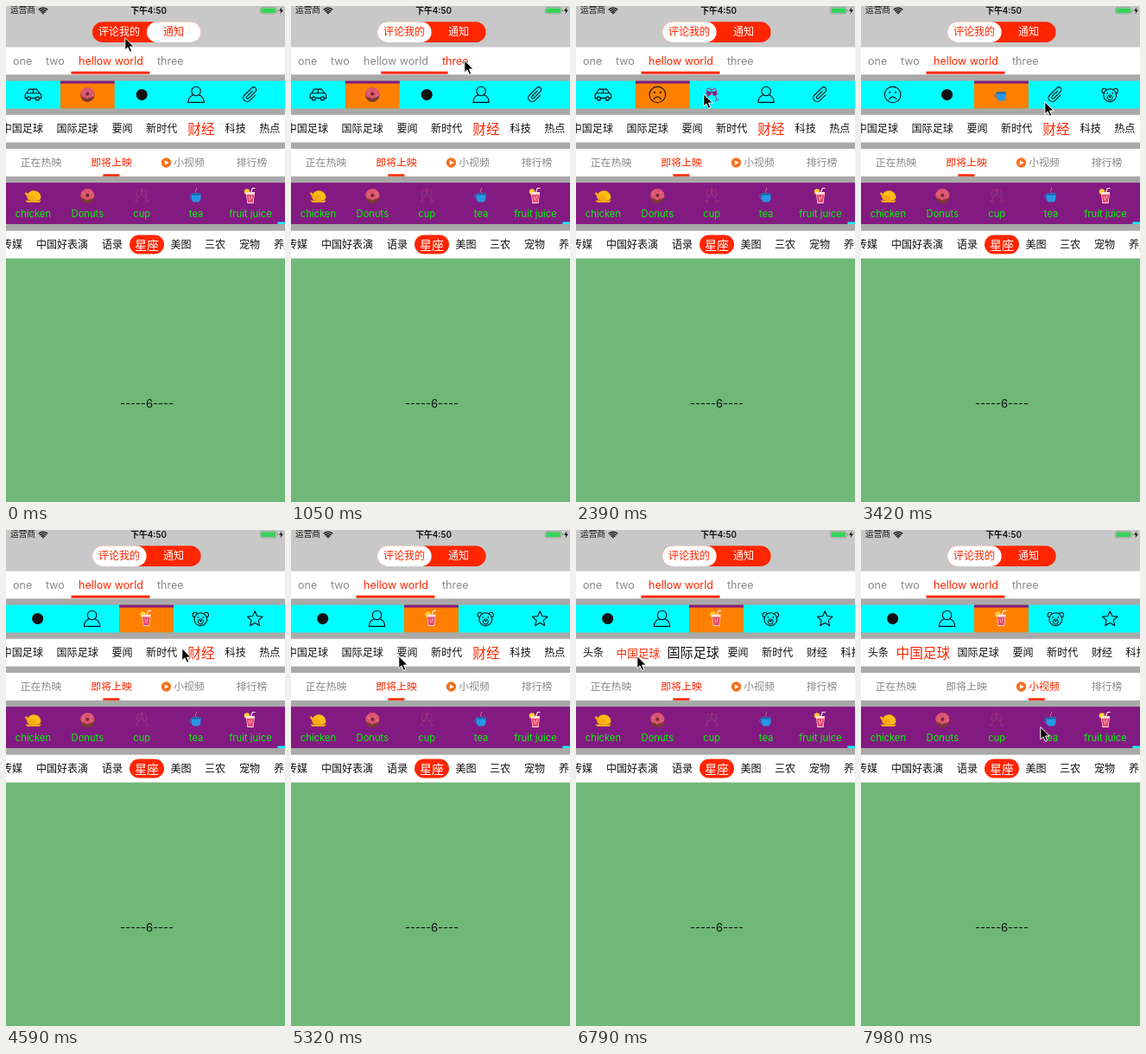
These frames come from a looping animation (323 px wide and 573 px high, 8 s). An HTML page with a canvas:

```html
<!DOCTYPE html>
<html lang="zh">
<head>
<meta charset="utf-8">
<title>Tab bars</title>
<style>
html, body { margin: 0; width: 100%; height: 100%; overflow: hidden; background: #a9a9a9; }
canvas { display: block; width: 323px; height: 573px; }
</style>
</head>
<body>
<canvas id="stage"></canvas>
<script>
const W = 323, H = 573, LOOP = 8000, TICK = 147.5;
const PT = W / 375;
const RED = '#ff2600', CYAN = '#00fdff', PURPLE = '#831a82', ORANGE = '#ff8000', GRAY = '#888';
const FONT = 'Inter, "Noto Sans CJK SC", "Noto Sans CJK", sans-serif';
const BODY = 14 * PT;

const canvas = document.getElementById('stage');
const ctx = canvas.getContext('2d');
const dpr = window.devicePixelRatio || 1;
canvas.width = W * dpr;
canvas.height = H * dpr;

const mix = (a, b, p) => a + (b - a) * p;
const clamp = (v, lo, hi) => Math.min(hi, Math.max(lo, v));
const ease = x => x * x * (3 - 2 * x);

// taps: [time, index]; gives the last two selections and the progress between them
function selection(taps, t) {
  let i = 0;
  while (i + 1 < taps.length && taps[i + 1][0] <= t) i++;
  const to = taps[i][1];
  const from = i ? taps[i - 1][1] : to;
  const p = ease(clamp((t - taps[i][0]) / 2, 0, 1));
  return { to, at: f => mix(f(from), f(to), p) };
}

const taps = {
  pill: [[-9, 1], [0.3, 0]],
  words: [[-9, 2], [6.25, 3], [10.4, 2]],
  icons: [[-9, 1], [15.62, 2], [20.5, 3], [24.5, 4]],
  topics: [[-9, 5], [37.5, 3], [41.5, 2], [45.5, 1]],
  films: [[-9, 1], [49.5, 2]]
};

const pointer = [
  [0, 137, 36], [2, 137, 36], [3, 172, 66], [4, 200, 62], [8, 200, 62], [10, 124, 58],
  [13, 122, 60], [14, 143, 102], [15, 147, 101], [17, 147, 101], [18, 185, 116],
  [19, 212, 110], [26, 212, 110], [28, 226, 128], [29, 229, 136], [30, 229, 136],
  [31, 203, 136], [32, 185, 134], [36, 124, 145], [39, 124, 145], [40, 101, 147],
  [43, 101, 147], [44, 70, 145], [47, 70, 145], [49, 200, 176], [51, 200, 176],
  [53, 195, 217], [54, 207, 227]
];

function pointerAt(t) {
  const i = pointer.findIndex(k => k[0] >= t);
  if (i <= 0) return pointer[i ? pointer.length - 1 : 0].slice(1);
  const [a, b] = [pointer[i - 1], pointer[i]];
  const p = (t - a[0]) / (b[0] - a[0]);
  return [mix(a[1], b[1], p), mix(a[2], b[2], p)];
}

// ---- drawing helpers ----
function rect(x, y, w, h, color) {
  ctx.fillStyle = color;
  ctx.fillRect(x, y, w, h);
}

// full-width band, top and bottom in points
function band(top, bottom, color) {
  rect(0, top * PT, W, (bottom - top) * PT, color);
}

function text(str, x, y, size, color, weight = 400, align = 'center') {
  ctx.font = `${weight} ${size}px ${FONT}`;
  ctx.textAlign = align;
  ctx.fillStyle = color;
  ctx.fillText(str, x, y + size * 0.36);
}

function capsule(x, y, w, h) {
  ctx.beginPath();
  ctx.roundRect(x, y, w, h, h / 2);
}

function line(d, color = '#111', width = 1.1) {
  ctx.strokeStyle = color;
  ctx.lineWidth = width;
  ctx.stroke(new Path2D(d));
}

function shape(d, color) {
  ctx.fillStyle = color;
  ctx.fill(new Path2D(d), 'evenodd');
}

const ring = (x, y, r) => `M${x - r},${y}a${r},${r} 0 1 1 ${2 * r},0a${r},${r} 0 1 1 ${-2 * r},0z`;

function at(x, y, draw, angle = 0) {
  ctx.save();
  ctx.translate(x, y);
  ctx.rotate(angle);
  draw();
  ctx.restore();
}

// ---- icons, centred on the origin ----
function car() {
  line('M-7,4H-9.3V0Q-9.3,-1.3 -7.5,-1.7L-5,-6.3H4L7.3,-1.7Q9.3,-1.2 9.3,1V4H7M3,4H-3M-7.5,-1.7H7.3M0,-6.3V-1.7');
  line(ring(-5, 4.5, 2) + ring(5, 4.5, 2));
}

function sad() {
  line(ring(0, 0, 9.3));
  shape(ring(-3.4, -2.6, 1.1) + ring(3.4, -2.6, 1.1), '#111');
  line('M-4.3,5.2Q0,-0.2 4.3,5.2');
}

const badge = () => shape(ring(0, 0, 6.5), '#111');

function person() {
  line(ring(0, -4, 5.2));
  line('M-3.2,0.4C-7,1.6 -9,4 -9.2,9H9.2C9,4 7,1.6 3.2,0.4');
}

function clip() {
  at(0, 0, () => line('M4.4,-3.4V5.4A4.4,4.4 0 0 1 -4.4,5.4V-6.6A3,3 0 0 1 1.6,-6.6V4.4A1.5,1.5 0 0 1 -1.4,4.4V-4.4'), 0.8);
}

function bear() {
  line('M-4,-5.6A2.8,2.8 0 1 0 -7,-1.6M4,-5.6A2.8,2.8 0 1 1 7,-1.6');
  line(ring(0, 0.8, 7.4));
  line(ring(0, 3.4, 3), '#111', 1);
  shape(ring(-3, -1.6, 0.9) + ring(3, -1.6, 0.9) + ring(0, 2.7, 1.2), '#111');
}

function star() {
  let d = '';
  for (let i = 0; i < 10; i++) {
    const r = i % 2 ? 4.3 : 9.3, a = i * Math.PI / 5;
    d += `${i ? 'L' : 'M'}${r * Math.sin(a)},${0.6 - r * Math.cos(a)}`;
  }
  line(d + 'z');
}

function donut() {
  shape(ring(0, 0.4, 8.2), '#7a3a30');
  shape('M-8,-1A8,7.4 0 0 1 8,-1Q8,2.6 5.8,2.4Q4,4.6 1.8,3.4Q-.5,6.5 -3,3.2Q-7.4,3.6 -8,-1z', '#dc5470');
  shape(ring(0, -0.8, 2), '#6a2c30');
  line('M-5,-2.6l1,.8M4.4,-4l-1,1M5,0l.8,.8', '#f3a9b4', 0.8);
}

function glasses() {
  for (const s of [-1, 1]) {
    at(4 * s, 0, () => {
      shape('M-2.7,-4H2.7L2.2,0Q0,2.6 -2.2,0z', '#7b2583');
      line('M-2.7,-6.8H2.7L2.4,-.5Q0,2.6 -2.4,-.5zM0,1.6V6.4M-2.2,6.8H2.2', '#a8327a', 0.8);
    }, -0.3 * s);
  }
  line('M0,-8.8V-7.6', '#d4566b', 0.8);
}

function tea() {
  line('M-4.4,-1Q-8,-1.4 -7.2,1.4Q-6.4,3.8 -3.6,3.6', '#1f7fd0', 1.1);
  shape('M-5.4,-3H5.4V2.6Q5,7 1.8,7H-1.8Q-5,7 -5.4,2.6z', '#2797e6');
  shape('M-5.4,-3H5.4V-1H-5.4z', '#1769ac');
}

function mug() {
  line('M0,-4Q-1.6,-5.8 0,-7.2T0,-9.4', '#d67a8d', 0.9);
  tea();
}

function juice() {
  line('M0,-3L2.4,-9H5.2', '#ffe6ec', 1.2);
  shape(ring(-4, -5, 3.2), '#ffcf2f');
  shape('M-5.2,-4.6H5.2L3.6,8.6H-3.6z', '#ffe2e0');
  shape('M-4.4,-1.8H4.4L3,7.6H-3z', '#ea4a70');
  line('M-1.4,1L-.4,4.4M1.8,0L1,3', '#ffb3b8', 1);
}

function chicken() {
  shape('M9,2C9,-4 4,-7 -1,-6C-5,-5 -7.5,-2 -7,2C-6.5,6.5 8.5,7 9,2z', '#fdbb16');
  shape('M3,3C3,-1 -2,-2 -4,0L-8,-4.6l-1.8,1.6L-5.6,2.4C-4,6 2,6.5 3,3z', '#f9a90f');
  shape('M9.5,5H-9L-7,7.6H7.4z', '#f0a81a');
}

// ---- rows ----
function statusBar() {
  text('运营商', 5, 5, 9.7, '#111', 400, 'left');
  for (const r of [2.6, 4.9, 7.2]) {
    ctx.beginPath();
    ctx.arc(43, 9.3, r, -2.3, -0.84);
    ctx.strokeStyle = '#111';
    ctx.lineWidth = 1.4;
    ctx.stroke();
  }
  shape(ring(43, 8.6, 0.9), '#111');
  text('下午4:50', 165, 5, 9.8, '#111', 600);
  ctx.beginPath();
  ctx.roundRect(294.5, 1.5, 18.5, 7.5, 2);
  ctx.strokeStyle = '#8c9c8c';
  ctx.lineWidth = 0.8;
  ctx.stroke();
  ctx.beginPath();
  ctx.roundRect(295.5, 2.5, 16.5, 5.5, 1);
  ctx.fillStyle = '#35d35a';
  ctx.fill();
  rect(313.8, 4, 1, 2.6, '#8c9c8c');
  shape('M319.5,1L316,5.8H318.4L317.4,9.4L321,4.4H318.6z', '#111');
}

function pillRow(t) {
  const x = selection(taps.pill, t).at(i => 100 + i * 63);
  const labels = color => {
    text('评论我的', 131, 30, BODY, color);
    text('通知', 194, 30, BODY, color);
  };
  capsule(100, 18.3, 125.6, 23.7);
  ctx.fillStyle = RED;
  ctx.fill();
  labels('#fff');
  ctx.save();
  capsule(x, 18.3, 62.6, 23.7);
  ctx.clip();
  rect(x, 18, 63, 25, '#fff');
  labels(RED);
  ctx.restore();
}

const words = [['one', 8, 22], ['two', 46, 22], ['hellow world', 84, 74], ['three', 175, 31]];

function wordRow(t) {
  const sel = selection(taps.words, t);
  band(55, 92, '#fff');
  words.forEach(([s, x], i) => text(s, x, 63.5, 12.5, i === sel.to ? RED : GRAY, 400, 'left'));
  rect(sel.at(i => words[i][1] - 8.5), 75.6, sel.at(i => words[i][2] + 17), 3, RED);
}

const CELL = 73 * PT;
const icons = [[car, car], [sad, donut], [badge, glasses], [person, tea], [clip, juice], [bear, bear], [star, star]];

function iconRow(t) {
  const sel = selection(taps.icons, t);
  const scroll = sel.at(i => Math.max(0, i * CELL - 131));
  const x = sel.at(i => i * CELL) - scroll;
  const top = 100.5 * PT;
  band(100.5, 137.5, CYAN);
  rect(x, top, CELL, 37 * PT, ORANGE);
  rect(x, top, CELL, 3, PURPLE);
  icons.forEach((pair, i) => at((i + 0.5) * CELL - scroll, 102.4, pair[i === sel.to ? 1 : 0]));
}

const topics = [];
['头条', '中国足球', '国际足球', '要闻', '新时代', '财经', '科技', '热点'].reduce((x, s) => {
  const w = s.length * BODY;
  topics.push([s, x + w / 2]);
  return x + w + 15.6;
}, 8);

function topicRow(t) {
  const sel = selection(taps.topics, t);
  const scroll = sel.at(i => clamp(topics[i][1] - 161.5, 0, 53));
  band(146, 183, '#fff');
  topics.forEach(([s, x], i) => {
    const grow = sel.at(j => j === i ? 1 : 0);
    text(s, x - scroll, 142, BODY * (1 + 0.3 * grow), i === sel.to ? RED : '#111');
  });
}

const films = [['正在热映', 40.5], ['即将上映', 122], ['小视频', 212], ['排行榜', 284.5]];

function filmRow(t) {
  const sel = selection(taps.films, t);
  band(191.5, 228.5, '#fff');
  films.forEach(([s, x], i) => text(s, x, 181, 11.9, i === sel.to ? RED : GRAY));
  shape(ring(185.5, 181, 5.7), '#f5701d');
  shape('M183.8,178.2L188.6,181L183.8,183.8z', '#fff');
  rect(sel.at(i => i * 81.4 + 31), 225.5 * PT, 19, 3 * PT, RED);
}

const foods = [['chicken', chicken], ['Donuts', donut], ['cup', glasses], ['tea', mug], ['fruit juice', juice]];

function foodRow() {
  band(237, 292.5, PURPLE);
  foods.forEach(([s, icon], i) => {
    const x = (i + 0.5) * CELL;
    at(x, 219.5, icon);
    text(s, x, 240, 13 * PT, '#00f900');
  });
  rect(5 * CELL, 249.5, W, 292.5 * PT - 249.5, CYAN);
}

const channels = [['传媒', 7], ['中国好表演', 65], ['语录', 123], ['美图', 202.5], ['三农', 242], ['宠物', 282], ['养生', 322]];

function channelRow() {
  band(301.5, 338.5, '#fff');
  channels.forEach(([s, x]) => text(s, x, 275.6, BODY, '#111'));
  capsule(143, 264.5, 40, 22);
  ctx.fillStyle = RED;
  ctx.fill();
  text('星座', 163, 275.6, 14, '#fff');
}

function drawPointer(t) {
  const [x, y] = pointerAt(t);
  at(x, y, () => {
    const arrow = 'M.8,1V14.8L4,11.8L6.4,17.2L8.8,16.2L6.5,11H11z';
    shape(arrow, '#000');
    line(arrow, '#fff', 1);
  });
}

function draw(t) {
  ctx.setTransform(dpr, 0, 0, dpr, 0, 0);
  ctx.lineJoin = ctx.lineCap = 'round';
  rect(0, 0, W, H, '#a9a9a9');
  band(0, 55, '#c8c8c8');
  statusBar();
  pillRow(t);
  wordRow(t);
  iconRow(t);
  topicRow(t);
  filmRow(t);
  foodRow();
  band(338.5, H / PT, '#6fb877');
  channelRow();
  text('-----6----', 163, 459, 13, '#111');
  drawPointer(t);
}

const start = performance.now();
function loop() {
  draw(Math.floor((performance.now() - start) % LOOP / TICK));
  requestAnimationFrame(loop);
}
loop();
</script>
</body>
</html>
```
